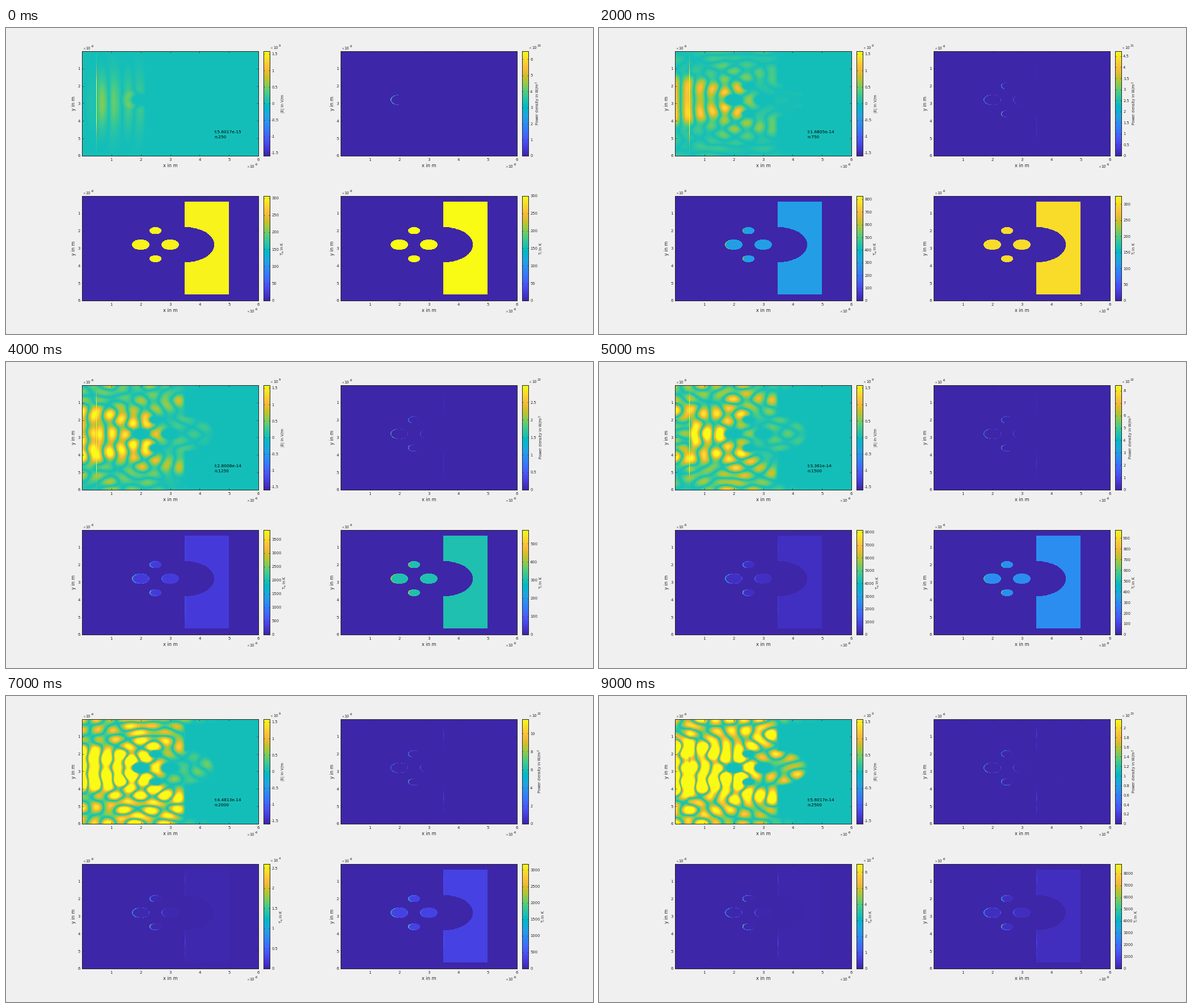
These frames come from a looping animation (1035 px wide and 541 px high, 10 s). A matplotlib script:

```python
import math

import numpy as np
import matplotlib.pyplot as plt
from matplotlib.animation import FuncAnimation
from matplotlib.colors import LinearSegmentedColormap

W, H = 1035, 541
INK = "#262626"
plt.rcParams["font.family"] = "DejaVu Sans"

STOPS = [0, 4, 8, 12, 16, 20, 24, 28, 30, 32, 36, 40, 44, 48, 52, 56, 60, 63]
COLORS = ("3e26a8 4537d5 484df0 4563fd 327cfc 2b91ef 20a5e3 08b5d0 02bac3 "
          "19bfb6 37c897 64cd6f 9dc943 d1bf27 f8ba3d fccf30 f5e924 f9fb15").split()
PARULA = LinearSegmentedColormap.from_list(
    "parula", [(s / 63, "#" + c) for s, c in zip(STOPS, COLORS)], N=256)

# Upper colour limits per frame as (mantissa, exponent)
E_MAX = 1.586
P_LIM = [(6.51, 20), (2.0, 21), (4.73, 21), (10.98, 21), (2.99, 22),
         (8.46, 22), (9.9, 22), (11.6, 22), (1.65, 23), (2.184, 23)]
TE_LIM = [(306, 0), (440, 0), (827, 0), (1767, 0), (3855, 0),
          (8178, 0), (1.5, 4), (2.606, 4), (4.3, 4), (6.5, 4)]
TI_LIM = [(v, 0) for v in (300, 306, 325.6, 396, 575, 977, 1800, 3181, 5500, 8812)]

# ---- wave simulation (lengths in micrometres) ----
N, DX = 300, 0.02
DT = 2.24067e-17
C_UM = 2.99792458e14
STRIDE = 2
S = STRIDE * DT * C_UM / DX
WAVELENGTH = 0.8
OMEGA = 2 * math.pi * C_UM / WAVELENGTH
SRC = 24
MID = 2.81


def metal(x, y):
    def disc(cx, cy, r):
        return (x - cx) ** 2 + (y - cy) ** 2 < r * r
    block = (x > 3.5) & (x < 5) & (y > 0.33) & (y < 5.66) & ~disc(3.5, MID, 1)
    return (block | disc(2, MID, 0.3) | disc(3, MID, 0.3)
            | disc(2.5, MID - 0.8, 0.2) | disc(2.5, MID + 0.8, 0.2))


def spread(a, mask):
    """Let heat leak to the neighbouring cells inside the metal."""
    def around(b):
        return (2 * b + np.roll(b, 1, 0) + np.roll(b, -1, 0)
                + np.roll(b, 1, 1) + np.roll(b, -1, 1))
    return mask * around(a) / np.maximum(around(mask), 1)


def amplitude(n):
    return 1.9 * math.exp(-((n - 2800) / 2000) ** 2)


def simulate():
    """Scalar field Ez between mirror walls, with lossy metal parts."""
    centre = (np.arange(N) + 0.5) * DX
    x, y = np.meshgrid(centre, centre)
    mask = metal(x, y).astype(np.float32)
    sponge = (x > 3.6) & (abs(y - 3) > 2.6) & (mask == 0)
    loss = 4.3 * mask + 0.03 * sponge
    keep = ((1 - loss) / (1 + loss)).astype(np.float32)
    gain = (S / (1 + loss)).astype(np.float32)
    beam = np.exp(-((centre - 2.95) / 1.5) ** 2).astype(np.float32)

    ez = np.zeros((N, N), np.float32)
    hx = np.zeros((N + 1, N), np.float32)
    hy = np.zeros((N, N + 1), np.float32)
    dose, lattice, power = (np.zeros((N, N)) for _ in range(3))

    shots = []
    per_shot = 250 // STRIDE
    for step in range(10 * per_shot):
        hx[1:-1] -= S * (ez[1:] - ez[:-1])
        hy[:, 1:-1] += S * (ez[:, 1:] - ez[:, :-1])
        ez = keep * ez + gain * (hy[:, 1:] - hy[:, :-1] - hx[1:] + hx[:-1])
        n = (step + 0.5) * STRIDE
        drive = 2 * S * amplitude(n) * math.sin(OMEGA * n * DT)
        ez[:, SRC] += np.float32(drive) * beam

        if step % 5 == 0:
            heat = mask * ez ** 2
            power = 0.8 * power + 0.2 * heat
            dose += heat
            lattice += dose
        if (step + 1) % per_shot == 0:
            field = abs(ez)
            n = (step + 1) * STRIDE
            if n <= 1500:
                field[:, SRC] = np.maximum(field[:, SRC], 8 * amplitude(n) * beam)
            maps = power, spread(dose, mask), spread(lattice, mask)
            shots.append((field, *(m / m.max() for m in maps)))
    return mask, shots


# ---- drawing ----
fig = plt.figure(figsize=(W / 72, H / 72 + 1e-9), dpi=72, facecolor="#f0f0f0")


def label(x, y, s, size, **kw):
    kw = {"ha": "center", "va": "center", "color": INK, **kw}
    return fig.text(x / W, 1 - y / H, s, fontsize=size, **kw)


def axes(x, y, w, h):
    ax = fig.add_axes([x / W, 1 - (y + h) / H, w / W, h / H])
    for spine in ax.spines.values():
        spine.set(linewidth=1, color=INK)
    return ax


def power_of_ten(x, y, exponent):
    return [label(x, y + 0.5, "×", 6, ha="left", color="#555555"),
            label(x + 5.5, y, "10", 6.8, ha="left"),
            label(x + 14.8, y - 3.5, exponent, 5.5, ha="left")]


def tick_step(span):
    for k in range(-2, 6):
        for m in (1, 2, 5):
            if span / (m * 10.0 ** k) < 11:
                return m * 10.0 ** k


class Panel:
    WIDTH, HEIGHT = 311, 185

    def __init__(self, x, y, name, shift=0):
        w, h = self.WIDTH, self.HEIGHT
        self.bar_x, self.shift = x + 320, shift
        ax = axes(x, y, w, h)
        self.image = ax.imshow(np.zeros((N, N)), cmap=PARULA, vmin=0, vmax=1,
                               extent=(0, 6, 6, 0), aspect="auto",
                               interpolation="nearest")
        ax.set_xticks(range(1, 7))
        ax.set_yticks(range(1, 7))
        ax.tick_params(direction="in", top=True, right=True, length=3,
                       width=0.6, color=INK, labelcolor=INK, labelsize=7)
        ax.tick_params(axis="x", pad=4)
        ax.tick_params(axis="y", pad=3.5)
        label(x + 156, y + h + 17.7, "x in m", 8.2)
        label(x - 14.2, y + h / 2, "y in m", 8.2, rotation=90)
        power_of_ten(x + 1, y - 5, "-6")
        power_of_ten(x + 290, y + h + 19.2, "-6")

        self.bar = axes(self.bar_x, y, 11, h)
        self.bar.imshow(np.linspace(0, 1, 256)[:, None], cmap=PARULA,
                        origin="lower", extent=(0, 1, 0, 1), aspect="auto")
        self.bar.set_xticks([])
        self.bar.yaxis.tick_right()
        self.bar.tick_params(direction="in", left=True, length=2, width=0.6, pad=3,
                             color=INK, labelcolor=INK, labelsize=6.8)
        self.scale = power_of_ten(x + 331.4, y - 6, "")
        self.name = label(0, y + h / 2, name, 6.8, rotation=90)

    def show(self, data, low, high, exponent=0):
        self.image.set_data(np.clip((data - low) / (high - low), 0, 1))
        step = tick_step(high - low)
        first, last = math.ceil(low / step), math.floor(high / step + 1e-9)
        ticks = [round(i * step, 6) for i in range(first, last + 1)]
        texts = [f"{t:g}" for t in ticks]
        self.bar.set_yticks([(t - low) / (high - low) for t in ticks], texts)
        self.bar.set_ylim(0, 1)
        for part in self.scale:
            part.set_visible(exponent != 0)
        self.scale[2].set_text(str(exponent))
        narrow = {"-": 0.36, ".": 0.32}
        width = max(sum(narrow.get(c, 0.636) for c in s) for s in texts) * 6.8
        self.name.set_x((self.bar_x + 21 + width + self.shift) / W)


metal_cells, shots = simulate()
LEFT, RIGHT, TOP, BOTTOM = 134.1, 590.1, 40.9, 296.9
field_panel = Panel(LEFT, TOP, "|E| in V/m")
power_panel = Panel(RIGHT, TOP, r"Power density in W/m$^{\mathdefault{3}}$", 2)
electron_panel = Panel(LEFT, BOTTOM, r"T$_{\mathdefault{e}}$ in K")
ion_panel = Panel(RIGHT, BOTTOM, r"T$_{\mathdefault{i}}$ in K")
time_text = label(367.5, 183.5, "", 7.4, ha="left", color="black")
count_text = label(367.5, 193, "", 7.4, ha="left", color="black")


def temperature(rise, limit):
    high, exponent = limit
    base = 300 / 10 ** exponent
    return metal_cells * (base + (high - base) * rise)


def update(i):
    field, power, electrons, ions = shots[i]
    field_panel.show(field, -E_MAX, E_MAX, 9)
    power_panel.show(power * P_LIM[i][0], 0, *P_LIM[i])
    electron_panel.show(temperature(electrons, TE_LIM[i]), 0, *TE_LIM[i])
    ion_panel.show(temperature(ions, TI_LIM[i]), 0, *TI_LIM[i])
    n = 250 * (i + 1)
    time_text.set_text(f"t:{n * DT:.5g}")
    count_text.set_text(f"n:{n}")
    return []


anim = FuncAnimation(fig, update, frames=10, interval=1000, repeat=True,
                     repeat_delay=0, blit=False)
plt.show()
```
